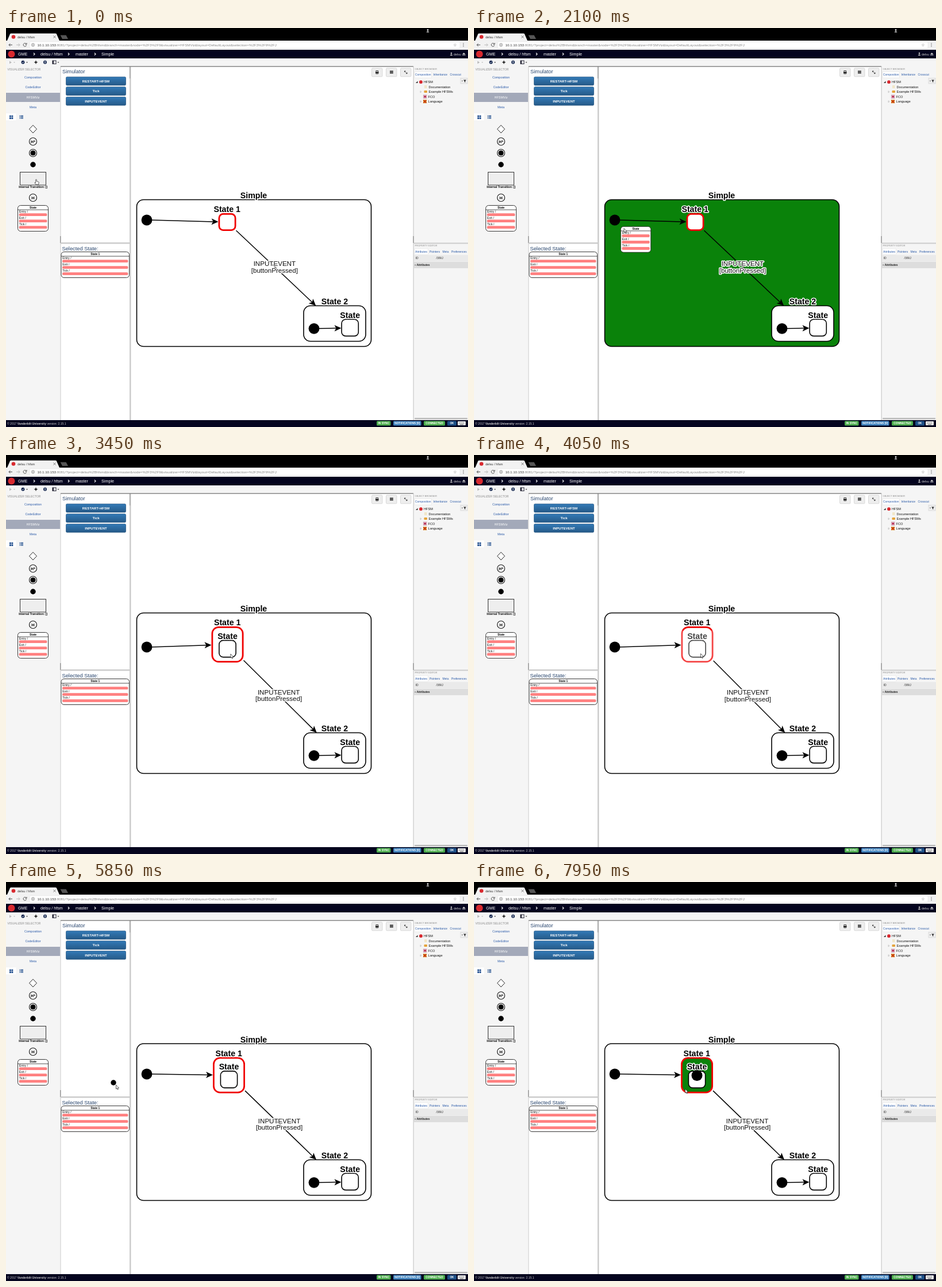
Animation of 804 by 696 pixels, one loop 8 s. Source, as an HTML page:

```html
<!DOCTYPE html>
<html lang="en">
<head>
<meta charset="utf-8">
<title>State machine editor</title>
<style>
html, body { margin: 0; width: 100%; height: 100%; overflow: hidden; background: #fff; }
svg { display: block; width: 804px; height: 696px; font-family: "Liberation Sans", Arial, sans-serif; }
text { white-space: pre; }
.halo { paint-order: stroke; stroke: #fff; stroke-width: 3.2px; stroke-linejoin: round; }
</style>
</head>
<body>
<svg viewBox="0 0 804 696">
  <defs>
    <linearGradient id="button" x2="0" y2="1">
      <stop stop-color="#337ab7"/><stop offset="1" stop-color="#265a88"/>
    </linearGradient>
  </defs>
  <g id="page"></g>
  <g id="scene"></g>
</svg>
<script>
const USER = 'delsu', NAVY = '#04041e', LINK = '#2a5aa8', PANEL = '#f5f5f5';

// Markup helpers; text is centred vertically on y.
const text = (x, y, s, size, fill = '#000', more = '') =>
  `<text x="${x}" y="${y + size * .36}" font-size="${size}" fill="${fill}" ${more}>${s}</text>`;
const mid = (x, y, s, size, fill, more = '') => text(x, y, s, size, fill, 'text-anchor="middle" ' + more);
const rect = (x, y, w, h, fill, more = '') =>
  `<rect x="${x}" y="${y}" width="${w}" height="${h}" fill="${fill}" ${more}/>`;
const circle = (x, y, r, fill = '#000', more = '') =>
  `<circle cx="${x}" cy="${y}" r="${r}" fill="${fill}" ${more}/>`;
const path = (d, fill = 'none', more = '') => `<path d="${d}" fill="${fill}" ${more}/>`;
const line = (color, width = 1) => `stroke="${color}" stroke-width="${width}"`;
const BOLD = 'font-weight="bold"';

function card(x, y, w, title) {
  let s = rect(x, y, w, 45, '#fff', 'rx="5" ' + line('#222', .9)) +
    mid(x + w / 2, y + 3.8, title, 4.9, '#000', BOLD) +
    path(`M${x} ${y + 7.6}h${w}`, 'none', line('#222', .8));
  ['Entry /', 'Exit /', 'Tick /'].forEach((name, i) => {
    const top = y + 11 * i;
    s += text(x + 2.2, top + 10.8, name, 5.4, '#111') +
      rect(x + 2, top + 13.8, w - 4, 4.8, '#ff8080', 'rx="2.2"');
  });
  return s;
}

function browserChrome() {
  return rect(0, 0, 804, 22, '#000') +
    path('M2 22 7 10.5Q7.500 9.500 9 9.500H86Q87.500 9.500 88 10.500L93 22z', '#f2f2f2') +
    circle(13, 15.500, 3.3, '#d8292f') + text(20, 15.500, USER + ' / hfsm', 5.600, '#333') +
    path('M82.500 13.500l4 4m0-4l-4 4', 'none', line('#555', .8)) +
    path('M94.500 12.500h10l3.500 6.500h-10z', '#555') +
    circle(734, 3.500, 1.400, '#ddd') + path('M731.500 7.500q2.500-4 5 0z', '#ddd') +
    rect(0, 22, 804, 16, '#f2f2f2') + rect(41, 24, 749, 11.500, '#fff', 'rx="1.500" ' + line('#ddd', .5)) +
    path('M11 29.500H5m2.500-2.500L5 29.500l2.500 2.500', 'none', line('#555')) +
    path('M18 29.500h6m-2.500-2.500l2.500 2.500-2.500 2.500', 'none', line('#bbb')) +
    path('M35 27.500a2.800 2.800 0 1 0 .6 2.500M36 26v2.500h-2.500', 'none', line('#555')) +
    circle(47, 29.500, 2.600, 'none', line('#666', .7)) + path('M47 28v3', 'none', line('#666', .8)) +
    text(54.500, 29.800, `10.1.10.153<tspan fill="#888">:8081/?project=${USER}%2Bhfsm&amp;branch=master&amp;node=%2F3%2F9` +
      '&amp;visualizer=HFSMViz&amp;layout=DefaultLayout&amp;selection=%2F3%2F9%2FJ</tspan>', 6.160, '#333') +
    mid(781.500, 29.500, '☆', 7, '#555') + [27, 29.500, 32].map(y => circle(796, y, .7, '#555')).join('');
}

function navigation() {
  let s = rect(0, 38, 804, 15, NAVY) + circle(9.500, 45.500, 6, '#d8292f');
  [[21, 'GME'], [60, USER + ' / hfsm'], [121, 'master'], [166, 'Simple']]
    .forEach(([x, name]) => s += text(x, 45.500, name, 7.200, '#fff'));
  [49, 109, 155].forEach(x => s += path(`M${x - 1} 43.500l2 2-2 2`, 'none', line('#fff', 1.100)));
  s += circle(775, 44, 1.300, '#ccc') + path('M772.500 48q2.500-4 5 0z', '#ccc') +
    text(779, 45.800, USER, 5.400, '#ccc') + path('M794 46l2.800-3 2.800 3zM794 46.800h5.600v1h-5.600z', '#ccc');
  s += rect(0, 53, 804, 14, PANEL) + path('M6 57.500v5l4-2.500z', '#bbb') +
    circle(29.500, 59.800, 3, '#13264f') + path('M28 59.800l1.200 1.200 2-2.400', 'none', line('#fff', .8)) +
    path('M52 56.300l1 2.500 2.500 1-2.500 1-1 2.500-1-2.500-2.500-1 2.500-1z', '#222') +
    circle(68, 59.800, 3, '#13264f') + path('M68 61.800v-3.500m-1.400 1.400l1.400-1.400 1.400 1.400', 'none', line('#fff', .8)) +
    rect(81, 57, 6, 5.600, '#fff', line('#223')) + rect(81, 57, 2, 5.600, '#223');
  [[13, '#bbb'], [35, '#333'], [89.500, '#333']].forEach(([x, c]) => s += path(`M${x} 59.300h3l-1.500 1.600z`, c));
  return s;
}

function palette() {
  let s = rect(0, 67, 95, 617, PANEL) + text(2.500, 72.300, 'VISUALIZER SELECTOR', 5.050, '#888') +
    rect(0, 113, 94, 16, '#a3a9b9');
  ['Composition', 'CodeEditor', 'HFSMViz', 'Meta'].forEach((name, i) =>
    s += mid(47, 86 + 17.400 * i, name, 5.450, i == 2 ? '#fff' : LINK));
  s += rect(0, 149, 17.500, 12, '#fff');
  [6, 9.500].forEach(x => [152.500, 156].forEach(y => s += rect(x, y, 2.800, 2.800, '#1b4a8c')));
  [152.500, 154.700, 156.900].forEach(y => s += rect(23.500, y, 1.300, 1.300, '#1b4a8c') + rect(25.500, y, 4.500, 1.300, '#1b4a8c'));
  const ring = y => circle(47, y, 6.500, '#fff', line('#111', 1.100));
  return s + path('M47 169.500l6.500 6.800-6.500 6.800-6.500-6.800z', '#fff', line('#222')) +
    ring(198) + mid(47, 198, 'H*', 7, '#000', BOLD) + ring(218) + circle(47, 218, 4.600) + circle(47, 238.300, 4.700) +
    rect(24.500, 251.500, 45, 22.500, '#eee', line('#333')) +
    mid(47, 277.200, 'Internal Transition: []', 5, '#000', BOLD) +
    ring(296) + mid(47, 296, 'H', 7.500, '#000', BOLD) + card(20.500, 309.500, 53, 'State');
}

function simulator() {
  let s = rect(95, 67, 614, 617, '#fff') + rect(94.500, 67, 1, 617, '#ccc') + rect(94, 363, 1.500, 12, '#999') +
    rect(215, 67, 2.500, 617, '#ccc') + rect(215, 67, 1.200, 21, '#999') + rect(95, 374, 121, 2.500, '#ccc') +
    rect(95, 66.500, 614, 1.300, '#777') + text(98, 75.300, 'Simulator', 9.400, '#2b4870') +
    text(97.500, 384.800, 'Selected State:', 9.300, '#2b4870') + card(96, 390.500, 118.500, 'State 1');
  ['RESTART-HFSM', 'Tick', 'INPUTEVENT'].forEach((name, i) => {
    const y = 85.300 + 17.500 * i;
    s += rect(104.500, y, 104, 14.700, 'url(#button)', 'rx="1.800" ' + line('#245580', .7)) +
      mid(156.500, y + 7.500, name, 6.100, '#fff', BOLD);
  });
  [636.500, 661.500, 686.500].forEach(x => s += rect(x, 70, 18.500, 14.800, '#eee', 'rx="1.500" ' + line('#ccc', .7)));
  return s + rect(643, 76.500, 5.500, 2.500, '#222') + rect(644, 74.500, 3.500, 5.500, 'none', line('#222', .8)) +
    [74.500, 76.300, 78.100].map(y => rect(668, y, 5.800, 1.300, '#222')).join('') +
    path('M693.500 75l4.500 4.500m-4.500-2.500v-2h2m2.500 2.500v2h-2', 'none', line('#222', .8));
}

function inspector() {
  let s = rect(709, 67, 95, 617, PANEL) + rect(708.500, 67, 1.300, 617, '#ccc') + rect(708.300, 363, 1.500, 12, '#999') +
    text(711.500, 71.300, 'OBJECT BROWSER', 4.100, '#888') + rect(711, 76.500, 29.500, 10.500, '#fff', line('#ddd', .5)) +
    rect(710, 374.500, 94, 2, '#ccc') + text(711.500, 379.800, 'PROPERTY EDITOR', 4.100, '#888') +
    rect(711, 385, 23.500, 10.500, '#fff', line('#ddd', .5));
  [[712, 81.500, 'Composition'], [743.500, 81.500, 'Inheritance'], [772.500, 81.500, 'Crosscut'], [712, 390.300, 'Attributes'],
    [737, 390.300, 'Pointers'], [759.500, 390.300, 'Meta'], [775, 390.300, 'Preferences']]
    .forEach(([x, y, name]) => s += text(x, y, name, 4.950, LINK));
  s += rect(791, 87.500, 12, 9.500, '#eee', line('#ccc', .6)) + path('M796 90.500h5l-1.800 2v2.500l-1.400-1v-1.500z', '#222') +
    path('M794.500 91v2.500l-1.700-1.200z', '#666') + path('M713 96h3.500v-3.500z', '#333') + circle(722, 94.200, 2.900, '#d8292f');
  [[727, 94, 'HFSM'], [735.500, 102.700, 'Documentation'], [735.500, 111.300, 'Example HFSMs'], [734.500, 119.800, 'FCO'],
    [734.500, 128.300, 'Language']].forEach(([x, y, name]) => s += text(x, y, name, 5.650, '#111'));
  [111.300, 128.300].forEach(y => s += path(`M721 ${y - 1.500}l2 1.500-2 1.500z`, '#fff', line('#999', .5)));
  return s + rect(728, 100, 4.500, 5, '#f0e6c8') + rect(727.500, 109, 5.500, 4, '#e5a43c', 'rx="1"') +
    rect(726.500, 117, 5.500, 5.500, '#e8c8d4', line('#b05070', .5)) + circle(729.200, 119.800, 1.700, '#b01840') +
    rect(726, 125.200, 6, 6, '#e5b02c') + path('M726.500 125.700l5 5m0-5l-5 5', 'none', line('#c02418', 1.500)) +
    rect(710, 396, 94, 11.500, '#eaeaea') + text(712.500, 401.500, 'ID', 5, '#222') + text(748.500, 401.500, '/3/9/J', 5, '#222') +
    rect(710, 408, 94, 11, '#ddd') + text(711.500, 413.300, '▪ Attributes', 4.900, '#222', 'font-weight="600"') +
    rect(711, 680, 92, 2.500, '#bbb', 'rx="1"');
}

function footer() {
  let s = rect(0, 684, 804, 12, NAVY) +
    text(2, 690, `© 2017 <tspan ${BOLD}>Vanderbilt University</tspan> version: 2.15.1`, 5.050, '#ccc');
  [[645, 24.500, 'IN SYNC', '#4cae4c'], [674, 48.500, 'NOTIFICATIONS [0]', '#3f83bf'], [727, 37, 'CONNECTED', '#4cae4c'],
    [768, 16, 'OK', '#1d4f86']].forEach(([x, w, name, color]) =>
    s += rect(x, 685.500, w, 8, color, 'rx="1.500"') + mid(x + w / 2, 689.600, name, 4.800, '#fff', BOLD));
  s += rect(786, 686, 14, 7, '#eee', 'rx="1"');
  [688, 690].forEach(y => s += path(`M788 ${y}h10`, 'none', line('#444', .8) + ' stroke-dasharray="1 1"'));
  return s + path('M790 691.800h6', 'none', line('#444', .8));
}

// Pointer tip and inner state centre as [time, x, y].
const POINTER = [[0, 52.5, 264.5], [150, 52, 270], [750, 43, 322], [1800, 43, 322], [1950, 33, 330], [2100, 261, 349.5],
  [2250, 300, 351], [2400, 335, 350], [2550, 362, 348], [2700, 378.5, 347], [3000, 378.5, 347], [3600, 395, 347],
  [4050, 394.5, 346.5], [4200, 394.5, 353], [4350, 380, 350], [4950, 55, 246], [5100, 55, 246], [5400, 51, 242],
  [5550, 51, 242], [5700, 60, 250], [5850, 191.5, 354], [6000, 270, 372], [6600, 352, 373], [6750, 352, 373],
  [6900, 364.5, 366.5], [7200, 367.5, 361]];
const INNER = [[3000, 385.5, 338], [3600, 385.5, 338], [4050, 388.5, 338], [4200, 388, 344.5]];

function at(keys, t) {
  const i = keys.findIndex(k => k[0] > t);
  if (i < 0) return keys[keys.length - 1].slice(1);
  if (!i) return keys[0].slice(1);
  const [a, b] = [keys[i - 1], keys[i]], f = (t - a[0]) / (b[0] - a[0]);
  return [a[1] + (b[1] - a[1]) * f, a[2] + (b[2] - a[2]) * f];
}

const title = (x, y, s) => mid(x, y, s, 14.2, '#000', BOLD + ' class="halo"');
const node = (cx, cy, hw, hh, r, fill, color = '#000', width = 1.6) =>
  rect(cx - hw, cy - hh, 2 * hw, 2 * hh, fill, `rx="${r}" ` + line(color, width));

// Point on the border of a box on the way to (x, y).
function border(box, x, y) {
  const dx = x - box.x, dy = y - box.y, f = Math.min(box.w / Math.abs(dx), box.h / Math.abs(dy));
  return [box.x + dx * f, box.y + dy * f];
}

function edge([x1, y1], [x2, y2]) {
  const turn = Math.atan2(y2 - y1, x2 - x1), c = Math.cos(turn), s = Math.sin(turn);
  return path(`M${x1} ${y1}L${x2 - 8 * c} ${y2 - 8 * s}`, 'none', line('#000', 1.5)) +
    path('M0 0-12-5.5-9 0-12 5.500z', '#000', `transform="translate(${x2} ${y2}) rotate(${turn * 180 / Math.PI})"`);
}

function diagram(t) {
  const nested = t >= 3000, [ix, iy] = at(INNER, t);
  const one = nested ? { x: ix, y: iy - 7.5, w: 28, h: 31.5 } : { x: 385, y: 338.5, w: 15.5, h: 15.5 };
  const two = { x: 572, y: 515.5, w: 54, h: 31 };
  const top = one.y - one.h - 23.5;
  const canvasFill = t >= 2100 && t < 2700 ? '#0a820a' : t >= 6000 && t < 7050 ? '#f00' : '#fff';
  const oneFill = t >= 2700 && !nested || t >= 7050 ? '#0a820a' : '#fff';
  const start = border(one, two.x, two.y), end = border(two, one.x, one.y);
  const lx = (start[0] + end[0]) / 2 - 2.5, ly = (start[1] + end[1]) / 2 - 2;

  let s = rect(227.5, top, 408, 555.5 - top, canvasFill, 'rx="12" ' + line('#000', 1.6)) +
    circle(245, 335, 9.4) + edge([254, 335], border(one, 245, 335)) + edge(start, end) +
    node(one.x, one.y, one.w - 1.4, one.h - 1.4, nested ? 11 : 7, oneFill, '#f00000', 2.8) +
    node(two.x, two.y, two.w, two.h, 12, '#fff') + node(598.7, 522.8, 14.6, 14.6, 7, '#fff') +
    circle(536, 524.3, 9.4) + edge([545, 524.2], [583.5, 523.4]);
  if (nested) s += node(ix, iy, 14.6, 14.6, 7, '#fff') + title(ix, iy - 22.3, 'State');
  else if (t >= 2700) s += circle(385, 331.500, 4, '#701838', line('#222848', 1));
  if (t >= 3600 && t < 4350) s += rect(ix - 28.5, iy - 32, 57, 57, '#fff', 'opacity=".27"');
  s += title(431, top - 7.6, 'Simple') + title(one.x - .3, one.y - one.h - 7, 'State 1') +
    title(572, 476.6, 'State 2') + title(598.7, 500.8, 'State');
  ['INPUTEVENT', '[buttonPressed]'].forEach((name, i) =>
    s += mid(lx, ly - 5.8 + 11.6 * i, name, 11.6, '#111', 'class="halo"'));
  if (t >= 7800) s += circle(388, 337.5, 9.5);
  return s;
}

function pointer(t) {
  const [x, y] = at(POINTER, t);
  const hand = t < 1950 || t >= 4950 && t < 5700;
  let s = '';
  if (t >= 1950 && t < 3000) s += card(x - 5.7, y - 3.2, 52.5, 'State');
  if (t >= 5700 && t < 7800) s += t < 6000 ? circle(x - 4.5, y - 4, 4.7) : circle(x - 1.5, y + 1.5, 4.7);
  const shape = hand
    ? 'M-.8 0Q0-.8.8 0V3L4 3.800Q5 4 4.700 5.500L4 8.500H-.5L-2.700 5.500Q-2.800 4.500-.8 5.500z'
    : 'M0 0V7L1.600 5.600 2.700 8.200 3.900 7.600 2.900 5.200H5z';
  return s + path(shape, '#fff', line('#222', .7) + ` transform="translate(${x} ${y})"`);
}

document.getElementById('page').innerHTML =
  browserChrome() + navigation() + palette() + simulator() + inspector() + footer();

const scene = document.getElementById('scene'), LOOP = 8000, STEP = 150;
let shown = -1;
function draw() {
  const t = Math.floor(performance.now() % LOOP / STEP) * STEP;
  if (t !== shown) scene.innerHTML = diagram(t) + pointer(t);
  shown = t;
  requestAnimationFrame(draw);
}
draw();
</script>
</body>
</html>
```
